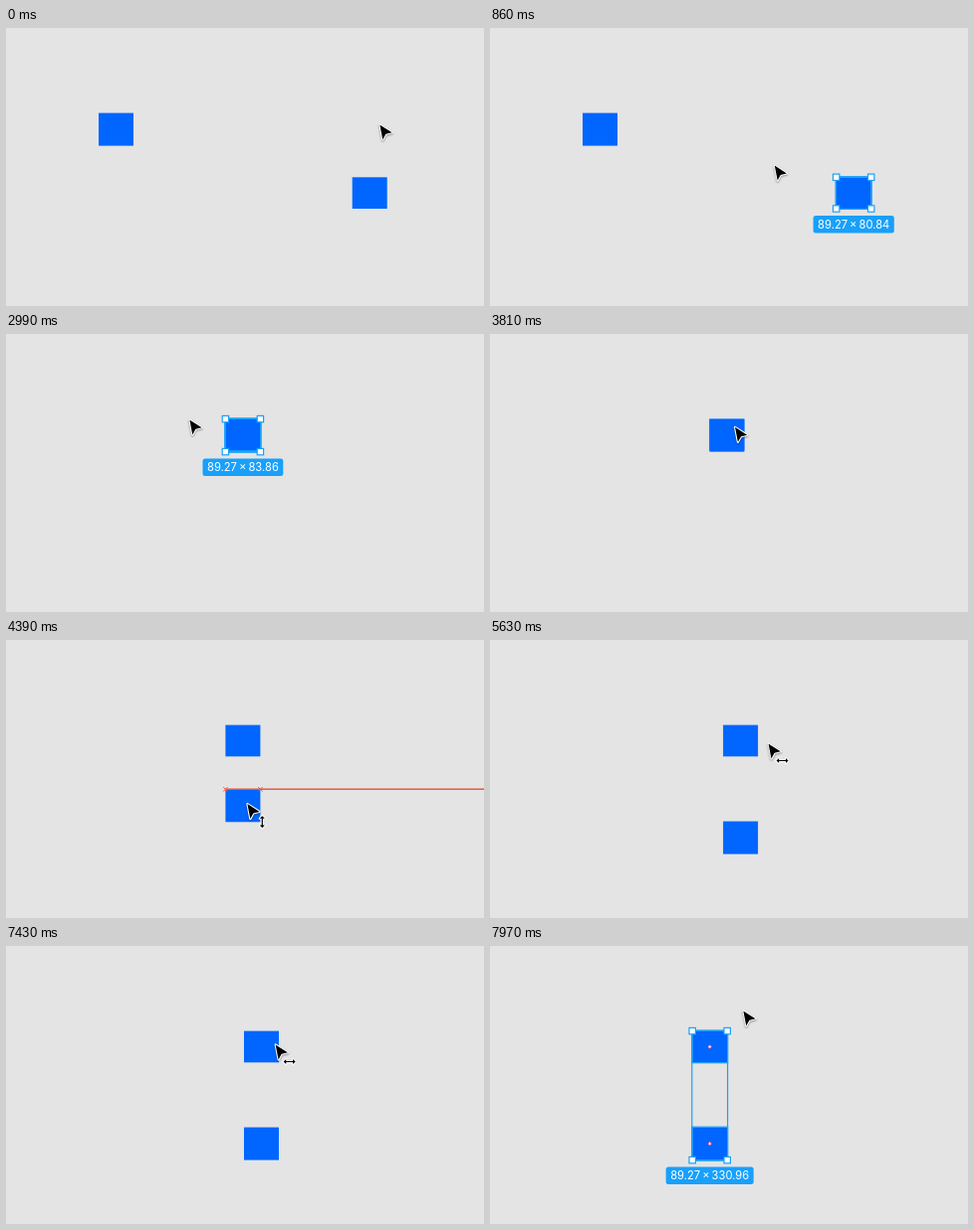
Write an HTML page with a canvas that moves like this. It is 480 px wide and 280 px high and loops after 8 s.

```html
<!DOCTYPE html>
<html lang="en">
<head>
<meta charset="utf-8">
<title>Aligning two squares</title>
<style>
  html, body { margin: 0; width: 100%; height: 100%; overflow: hidden; background: #e4e4e4; }
  canvas { display: block; width: 480px; height: 280px; }
</style>
</head>
<body>
<canvas id="stage"></canvas>
<script>
const LOOP = 8000, W = 480, H = 280;
const BLUE = '#0066ff', SELECT = '#18a0fb', GUIDE = '#f2553f', DOT = '#e8508c';
const SIZE = 35, TALL = 33, SHORT = 31.7, ROW = 85.6, MIDDLE = 150.3;

const canvas = document.getElementById('stage');
const ratio = window.devicePixelRatio || 1;
canvas.width = W * ratio;
canvas.height = H * ratio;
const ctx = canvas.getContext('2d');

const within = (t, from, to) => t >= from && t < to;

// Smooth progress from 0 to 1 between two times
function ease(t, from, to) {
  const p = Math.min(1, Math.max(0, (t - from) / (to - from)));
  return p * p * (3 - 2 * p);
}

const dropOffset = t => (MIDDLE - ROW) * ease(t, 4150, 4350) + 32.3 * ease(t, 4440, 4580);
const slideOffset = t => 60.8 * ease(t, 5525, 5870);
const returnOffset = t => -78 * ease(t, 7220, 7620);

function pointerAt(t) {
  let x = 375, y = 97;
  const glide = (from, to, toX, toY) => {
    const p = ease(t, from, to);
    x += (toX - x) * p;
    y += (toY - y) * p;
  };
  glide(60, 390, 365, 162);       // to the lower square
  glide(630, 1240, 117.5, 88);    // to the other one
  glide(1640, 1910, 149, 79);
  glide(2760, 2990, 184, 86);
  glide(2990, 3530, 266, 56.5);
  glide(3630, 3870, 242, 100);    // grab the taller square
  y += dropOffset(t);
  glide(4640, 4830, 251, 104);    // grab the column
  glide(5415, 5870, 312, 104);
  glide(6300, 6600, 312.5, 99);
  x += returnOffset(t);
  glide(7690, 7970, 254, 65);
  return [x, y];
}

function paint(points, fill, edge, width) {
  ctx.beginPath();
  points.forEach(([x, y]) => ctx.lineTo(x, y));
  ctx.closePath();
  ctx.lineJoin = 'round';
  ctx.strokeStyle = edge;
  ctx.lineWidth = width;
  ctx.stroke();
  ctx.shadowColor = 'transparent';
  ctx.fillStyle = fill;
  ctx.fill();
}

function line(x1, y1, x2, y2, width) {
  ctx.beginPath();
  ctx.moveTo(x1, y1);
  ctx.lineTo(x2, y2);
  ctx.strokeStyle = GUIDE;
  ctx.lineWidth = width;
  ctx.stroke();
}

function outline({ x, y, w, h }, width, outset = 0) {
  ctx.strokeStyle = SELECT;
  ctx.lineWidth = width;
  ctx.strokeRect(x - outset, y - outset, w + 2 * outset, h + 2 * outset);
}

function label(text, mid, top) {
  ctx.font = '400 11.2px Inter, sans-serif';
  ctx.textAlign = 'center';
  const width = ctx.measureText(text).width + 9;
  ctx.fillStyle = SELECT;
  ctx.beginPath();
  ctx.roundRect(mid - width / 2, top, width, 17.5, 2.5);
  ctx.fill();
  ctx.fillStyle = '#fff';
  ctx.fillText(text, mid, top + 12.8);
}

function selection(boxes, width, height) {
  const x = Math.min(...boxes.map(b => b.x)), y = Math.min(...boxes.map(b => b.y));
  const w = Math.max(...boxes.map(b => b.x + b.w)) - x;
  const h = Math.max(...boxes.map(b => b.y + b.h)) - y;
  boxes.forEach(b => outline(b, 1.2, 0.4));
  outline({ x, y, w, h }, 1.2, 0.4);
  for (const cx of [x, x + w]) for (const cy of [y, y + h]) {
    const handle = { x: cx - 3.2, y: cy - 3.2, w: 6.4, h: 6.4 };
    ctx.fillStyle = '#fff';
    ctx.fillRect(handle.x, handle.y, handle.w, handle.h);
    outline(handle, 1.2);
  }
  label(`${width}\u2009×\u2009${height}`, x + w / 2, y + h + 7);
}

function centerDot({ x, y, w, h }) {
  ctx.beginPath();
  ctx.arc(x + w / 2, y + h / 2, 1.5, 0, 7);
  ctx.fillStyle = '#fff';
  ctx.fill();
  ctx.strokeStyle = DOT;
  ctx.lineWidth = 1;
  ctx.stroke();
}

function guide(y, crosses) {
  line(crosses[0], y, W, y, 1.4);
  for (const x of crosses) for (const d of [-2.2, 2.2]) line(x - 2.2, y - d, x + 2.2, y + d, 1);
}

function arrow(x, y) {
  ctx.save();
  ctx.translate(x, y);
  ctx.shadowColor = 'rgba(0,0,0,.4)';
  ctx.shadowBlur = 2 * ratio;
  ctx.shadowOffsetY = ratio;
  paint([[0.4, 0.4], [12.6, 8.3], [6.4, 9.8], [3.3, 15.4]], '#000', '#fff', 2.2);
  ctx.restore();
}

// Half an outline, then the same half turned around
function doubleArrow(x, y, vertical, half, head, shaft, fill, edge) {
  const neck = half - head;
  const end = [[neck, -shaft], [neck, -head], [half, 0], [neck, head], [neck, shaft]];
  ctx.save();
  ctx.translate(x, y);
  if (vertical) ctx.rotate(Math.PI / 2);
  paint([...end, ...end.map(([a, b]) => [-a, -b])], fill, edge, 2);
  ctx.restore();
}

const resizePointer = (x, y, vertical) => doubleArrow(x, y, vertical, 8.3, 3, 0.8, '#fff', '#000');
const axisBadge = (x, y, vertical) => doubleArrow(x, y, vertical, 6, 2.6, 0.6, '#000', '#fff');

function pointer(t) {
  const [x, y] = pointerAt(t);
  if (within(t, 1200, 2270)) return resizePointer(x, y, true);
  if (within(t, 6500, 7100)) return resizePointer(x, y, false);
  arrow(x, y);
  if (within(t, 4200, 4620)) axisBadge(x + 15.3, y + 18.5, true);
  if (within(t, 5290, 6300) || within(t, 7220, 7660)) axisBadge(x + 14.4, y + 17.5, false);
}

function draw(t) {
  ctx.setTransform(ratio, 0, 0, ratio, 0, 0);
  ctx.fillStyle = '#e4e4e4';
  ctx.fillRect(0, 0, W, H);

  const centered = t >= 2760, x = 220.4 + slideOffset(t) + returnOffset(t);
  const tall = { x: centered ? x : 93, y: ROW + dropOffset(t), w: SIZE, h: TALL };
  const short = { x: centered ? x : 347.7, y: t < 1640 ? MIDDLE : ROW, w: SIZE, h: SHORT };
  const both = [tall, short];

  ctx.fillStyle = BLUE;
  both.forEach(b => ctx.fillRect(b.x, b.y, b.w, b.h));

  if (within(t, 330, 630) || within(t, 4780, 5080)) outline(short, 2);
  if (within(t, 3820, 4110)) outline(tall, 2);

  if (within(t, 630, 1180)) selection([short], '89.27', '80.84');
  if (within(t, 1180, 1640)) selection(both, '739.65', '246.17');
  if (within(t, 2930, 3630)) selection(both, '89.27', '83.86');
  if (within(t, 4110, 4200) || within(t, 4620, 5080)) selection([tall], '89.27', '83.86');
  if (within(t, 5080, 5290) || within(t, 6300, 6580) || t >= 7660) {
    selection(both, '89.27', '330.96');
    both.forEach(centerDot);
  }

  if (within(t, 4340, 4450)) guide(MIDDLE, [x, x + SIZE]);
  if (within(t, 5290, 5570) || within(t, 7220, 7340)) guide(MIDDLE, [x + SIZE / 2]);

  pointer(t);
}

function frame() {
  draw(performance.now() % LOOP);
  requestAnimationFrame(frame);
}
frame();
</script>
</body>
</html>
```
